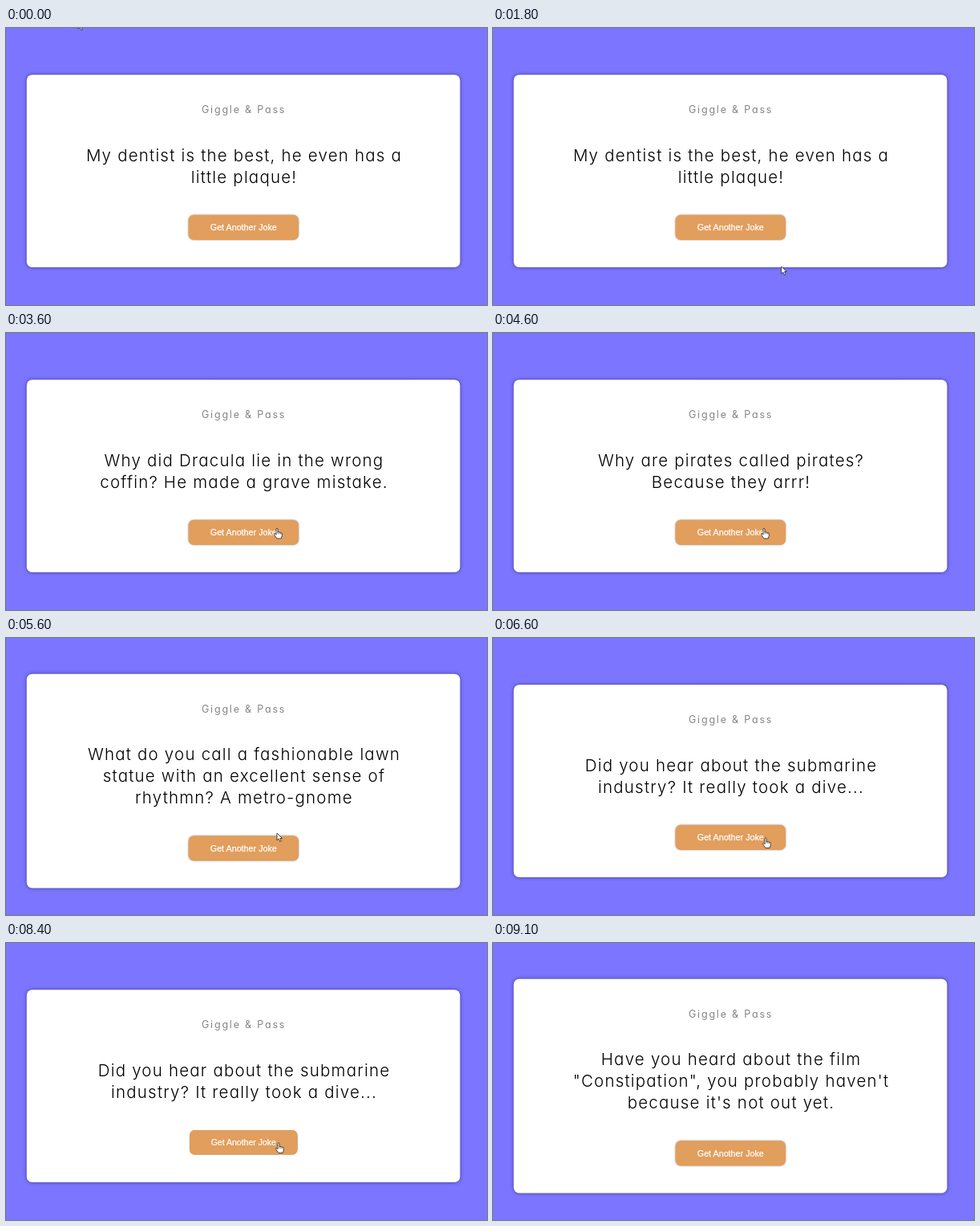
An HTML page for the animation above (9400 ms loop, 600 px wide and 345 px high).

```html
<!DOCTYPE html>
<html lang="en">
<head>
<meta charset="utf-8">
<title>Joke card</title>
<style>
  html, body { margin: 0; width: 100%; height: 100%; overflow: hidden; background: #7b75ff; }
  svg { display: block; width: 600px; height: 345px; }
  text { text-anchor: middle; white-space: pre; }
  .title, .joke { font-family: Inter, "Open Sans", sans-serif; font-feature-settings: "cv11"; }
  .title { font-size: 12.5px; letter-spacing: 1.8px; fill: #858585; }
  .joke { font-size: 20.5px; font-weight: 360; letter-spacing: 1.2px; fill: #000; }
  .label { font: 10.75px "Liberation Sans", Arial, sans-serif; fill: #fff; stroke: #fff; stroke-width: .25; }
  .card { fill: #fff; filter: drop-shadow(0 .5px 2px rgba(0, 0, 0, .5)); }
  .face { fill: #e19e5d; filter: drop-shadow(0 .3px .8px rgba(0, 0, 0, .35)); }
  .cursor { fill: #fff; stroke: #222; stroke-width: .8; stroke-linejoin: round; }
</style>
</head>
<body>
<svg viewBox="0 0 600 345">
  <rect id="card" class="card" x="25.8" width="540.6" rx="6.8"/>
  <g id="copy">
    <text class="title" x="296.6" y="106">Giggle &amp; Pass</text>
    <text class="joke" x="297" y="165.8"></text>
    <text class="joke" x="297" y="192.8"></text>
    <text class="joke" x="297" y="219.8"></text>
  </g>
  <g id="button">
    <rect class="face" x="-68.8" y="-15.7" width="137.6" height="31.4" rx="6.8"/>
    <text class="label" y="3.7">Get Another Joke</text>
  </g>
  <g id="arrow" class="cursor">
    <path d="M0 0V9L2.1 7.1L3.7 10.6L5.3 9.9L3.8 6.5H6.5Z"/>
  </g>
  <g id="hand" class="cursor">
    <path d="M-1 1Q0-.8 1 1V5Q2.2 4.2 2.9 5.3Q4.1 4.7 4.7 5.8Q6.2 5.4 6.3 7V9.5L5.2 13H0L-3.4 8.4Q-3.7 6.7-2.2 7.1L-1 8.3Z"/>
    <path d="M1 5V7.3M2.9 5.6V7.5M4.7 6V7.7" fill="none" stroke-width=".6"/>
  </g>
</svg>
<script>
const LOOP = 9400, STEP = 100;
const LINE = 27;            // line height of a joke
const REPLY = 400;          // from click to new joke
const PRESS = 200, GLIDE = 300;
const POINTER_END = 9000;
const CENTER = { x: 296.3, y: 178.1 };

const jokes = [
  { at: 0, lines: ["My dentist is the best, he even has a", "little plaque!"] },
  { at: 2500, lines: ["Why did Dracula lie in the wrong", "coffin? He made a grave mistake."] },
  { at: 4600, lines: ["Why are pirates called pirates?", "Because they arrr!"] },
  { at: 5600, lines: ["What do you call a fashionable lawn", "statue with an excellent sense of", "rhythmn? A metro-gnome"] },
  { at: 6400, lines: ["Did you hear about the submarine", "industry? It really took a dive..."] },
  { at: 8700, lines: ["Have you heard about the film", "\"Constipation\", you probably haven't", "because it's not out yet."] }
];

// The pointer glides to each stop, then rests there.
const stops = [
  { at: 300, x: 284, y: 155 },
  { at: 800, x: 320, y: 238 },
  { at: 1200, x: 359.7, y: 297 },
  { at: 1900, x: 338, y: 243 },
  { at: 5600, x: 340, y: 248.5 }
];

const get = id => document.getElementById(id);
const [card, copy, button, arrow, hand] = ["card", "copy", "button", "arrow", "hand"].map(get);
const rows = document.querySelectorAll(".joke");

const clamp = v => Math.min(1, Math.max(0, v));
const ease = k => k * k * (3 - 2 * k);

function pointerAt(t) {
  let x = 90, y = -8;
  for (const stop of stops) {
    const k = ease(clamp((t - stop.at) / GLIDE));
    x += (stop.x - x) * k;
    y += (stop.y - y) * k;
  }
  return { x, y };
}

const isPressed = t => jokes.some(({ at }) => at && t >= at - REPLY && t < at - REPLY + PRESS);

function place(el, x, y, scale = 1) {
  el.setAttribute("transform", `translate(${x} ${y}) scale(${scale})`);
}

function draw(t) {
  const { lines } = jokes.filter(j => j.at <= t).pop();
  rows.forEach((row, i) => {
    const line = lines[i] || "";
    if (row.textContent !== line) row.textContent = line;
  });

  // The card grows evenly from its centre with each extra line.
  const shift = (lines.length - 2) * LINE / 2;
  const half = 119.9 + shift;
  card.setAttribute("y", CENTER.y - half);
  card.setAttribute("height", 2 * half);
  place(copy, 0, -shift);
  const buttonY = CENTER.y + half - 49.6;
  place(button, CENTER.x, buttonY, isPressed(t) ? 0.98 : 1);

  const { x, y } = pointerAt(t);
  const over = Math.abs(x - CENTER.x) < 69 && Math.abs(y - buttonY) < 15.7;
  for (const [el, on] of [[arrow, !over], [hand, over]]) {
    place(el, x, y);
    el.style.display = on && t < POINTER_END ? "" : "none";
  }
}

const start = performance.now();
function tick() {
  const t = (performance.now() - start) % LOOP;
  draw(Math.floor(t / STEP) * STEP);
  requestAnimationFrame(tick);
}
tick();
</script>
</body>
</html>
```
